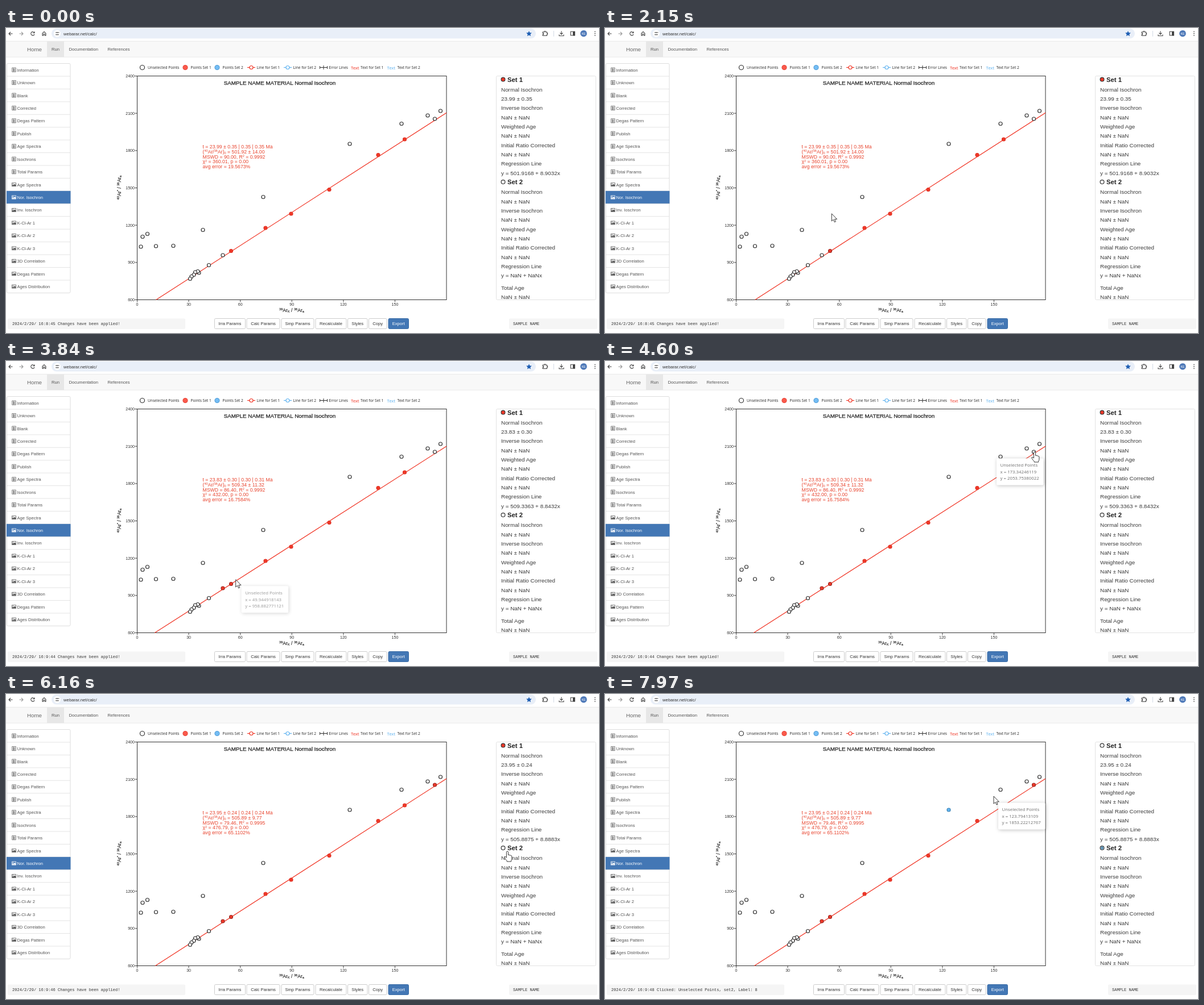
An HTML page for the animation above (8 s loop, 1042 by 537 pixels).

```html
<!DOCTYPE html>
<html lang="en">
<head>
<meta charset="utf-8">
<title>Normal Isochron</title>
<style>
html, body { margin: 0; width: 100%; height: 100%; overflow: hidden; background: #fff; }
svg { display: block; width: 1042px; height: 537px; font-family: "Liberation Sans", Arial, sans-serif; }
.ui { font-size: 7.65px; fill: #555; }
.noto { font-family: "Noto Sans", "Open Sans", sans-serif; }
.mono { font-family: "Liberation Mono", monospace; font-size: 7.03px; fill: #333; }
.axis { font-size: 7.1px; fill: #333; }
.panel { font-size: 9.88px; fill: #3a3a3a; }
.set { font-size: 11.3px; font-weight: bold; fill: #222; }
.fit { font-size: 8.7px; fill: #e8442e; }
.name { font-size: 8.7px; fill: #222; stroke: #222; stroke-width: .15px; }
.small { font-size: 5.6px; }
.mid { text-anchor: middle; }
.end { text-anchor: end; }
.icon { fill: none; stroke: #444; stroke-width: 1.1; }
</style>
</head>
<body>
<svg id="stage" viewBox="0 0 1042 537"></svg>
<script>
const LOOP = 8000;
const RED = '#f03828', BLUE = '#62b4f0', DARK = '#333', ACTIVE = '#4377b5';

// Pixel positions of the measured points
const open = [[237, 385], [240, 367.5], [248.5, 362.5], [263.5, 384], [294, 383.5], [346, 355.5],
  [452, 297.5], [356.5, 417.5], [339, 431], [337, 428.5], [332.5, 430], [330, 434.5], [326, 437.5],
  [323.5, 441.5], [695, 168.5], [741, 154], [763.5, 146]];
const chosen = [[456, 352], [501, 327], [568, 284.5], [654, 223.5], [700.5, 196]];
const clickable = [
  { x: 395.5, y: 392.5, at: 0, color: RED, rim: 1130 },
  { x: 381, y: 400, at: 3500, color: RED, rim: 3500 },
  { x: 753.5, y: 160, at: 5400, color: RED, rim: 5400 },
  { x: 604, y: 204, at: 7430, color: BLUE, rim: 9000 }
];

const fits = [
  { at: 0, t: '23.99', e: '0.35', more: '0.35 | 0.35', a: 501.9168, b: 8.9032, r: '501.92 ± 14.00',
    m: '90.00', r2: '0.9992', chi: '360.01', err: '19.5673' },
  { at: 3500, t: '23.83', e: '0.30', more: '0.30 | 0.31', a: 509.3363, b: 8.8432, r: '509.34 ± 11.32',
    m: '86.40', r2: '0.9992', chi: '432.00', err: '16.7584' },
  { at: 5400, t: '23.95', e: '0.24', more: '0.24 | 0.24', a: 505.8875, b: 8.8883, r: '505.89 ± 9.77',
    m: '79.46', r2: '0.9995', chi: '476.79', err: '65.1102' }
];

const done = 'Changes have been applied!';
const click = (set, label) => `Clicked: Unselected Points, set${set}, Label: ${label}`;
const logs = [
  { at: 0, text: '16:8:45 ' + done },
  { at: 3500, text: '16:9:44 ' + click(1, 5) },
  { at: 3740, text: '16:9:44 ' + done },
  { at: 5400, text: '16:9:46 ' + click(1, 9) },
  { at: 5630, text: '16:9:46 ' + done },
  { at: 7430, text: '16:9:48 ' + click(2, 8) }
];

const path = [[310, 955, 530], [1090, 427, 292], [1270, 419.5, 284], [1520, 420, 266], [1930, 405, 300],
  [2580, 380, 400], [3740, 380, 400], [4400, 755, 160], [5630, 755, 160], [6080, 881, 277],
  [6590, 881, 277], [6950, 603, 206.5], [7540, 603, 206.5], [7960, 683, 180]];
const hands = [[2540, 3800], [4360, 5680], [6060, 6630], [6930, 7580]];
const tips = [
  { from: 2560, to: 3980, max: 688, x: '49.944918143', y: '958.882771121' },
  { from: 4380, to: 5870, max: 688, x: '173.34246119', y: '2053.75380022' },
  { from: 6930, to: 8400, max: 691, x: '123.79413109', y: '1853.22212767' }
];

const text = (x, y, s, cls = 'ui', extra = '') => `<text x="${x}" y="${y}" class="${cls}" ${extra}>${s}</text>`;
const rect = (x, y, w, h, fill, stroke = 'none', r = 0) =>
  `<rect x="${x}" y="${y}" width="${w}" height="${h}" rx="${r}" fill="${fill}" stroke="${stroke}"/>`;
const circle = (x, y, r, fill, stroke = 'none', extra = '') =>
  `<circle cx="${x}" cy="${y}" r="${r}" fill="${fill}" stroke="${stroke}" stroke-width="1.2" ${extra}/>`;
const line = (d, color = DARK, w = 1) => `<path d="${d}" fill="none" stroke="${color}" stroke-width="${w}"/>`;
const icon = d => `<path class="icon" d="${d}"/>`;

// ^{..} raises and _{..} lowers the marked text
const rich = s => s.replace(/([\^_])\{(.*?)\}/g, (_, sign, body) => {
  const d = sign === '^' ? -2.6 : 1.4;
  return `<tspan class="small" dy="${d}">${body}</tspan><tspan dy="${-d}">&#8203;</tspan>`;
});

const px = x => 230.5 + x * 3.02;
const py = y => 478.5 - (y - 600) * 394 / 1800;

function browser() {
  return rect(0, 0, 1042, 23, '#fff') + rect(80, 1, 851, 17.5, '#e9eff8', 'none', 8.7) +
    icon('M11.5 10H5M8 7L5 10L8 13') +
    `<g opacity=".55">${icon('M23.5 10H30M27 7L30 10L27 13')}</g>` +
    icon('M49.6 8A3.2 3.2 0 1 0 50 11M50 6.2V8.7H47.4') +
    icon('M64 9.4L67 6.5L70 9.4V13.3H68.2V10.8H65.8V13.3H64Z') +
    circle(90, 9.8, 6, '#fff') + icon('M87 8H89M91 8H93.5M87 11.7H89M91 11.7H93') +
    circle(90, 8, .9, '#444') + circle(90, 11.7, .9, '#444') +
    text(101, 12.6, 'webarar.net/calc/', '', 'font-size="7.75" fill="#333"') +
    '<path d="M919 5.2l1.4 3 3.4.4-2.5 2.3.7 3.3-3-1.7-3 1.7.7-3.3-2.5-2.3 3.4-.4z" fill="#1f5fb4"/>' +
    icon('M943.2 7H946V5.8H948V7H950.5V9H951.6V11H950.5V13.5H943.2V11.4H944.6V9.2H943.2Z') +
    line('M962.5 5V15', '#d4dbe6') +
    icon('M976 5.5V11M973.5 8.7L976 11.2L978.5 8.7M972 11.5V13.7H980V11.5') +
    icon('M992.3 6.3H999.5V13H992.3Z') + rect(996, 6, 4, 7.4, '#444') +
    circle(1015, 9.7, 5.8, '#4e79b8') + text(1015, 11.6, 'KE', 'mid', 'font-size="5.2" fill="#fff"') +
    [6.3, 9.7, 13.1].map(y => circle(1035, y, .85, '#444')).join('');
}

function nav() {
  return rect(0, 23, 1042, 28, '#f8f8f8') + line('M0 23.3H1042M0 51.2H1042', '#e5e5e5', .8) +
    rect(72, 23.5, 30, 27.5, '#e7e7e7') + text(37, 40.8, 'Home', '', 'font-size="9.75" fill="#666"') +
    text(80, 40, 'Run') + text(110.5, 40, 'Documentation') + text(178.5, 40, 'References');
}

function sidebar() {
  const names = ['Information', 'Unknown', 'Blank', 'Corrected', 'Degas Pattern', 'Publish', 'Age Spectra',
    'Isochrons', 'Total Params', 'Age Spectra', 'Nor. Isochron', 'Inv. Ioschron', 'K-Cl-Ar 1', 'K-Cl-Ar 2',
    'K-Cl-Ar 3', '3D Correlation', 'Degas Pattern', 'Ages Distribution'];
  const step = 22.44;
  let out = rect(1.5, 62.5, 111.5, step * 18, '#fff', '#ddd', 2);
  names.forEach((name, i) => {
    const top = 62.5 + i * step, y = top + step / 2, on = i === 10;
    const ink = on ? '#fff' : '#555';
    if (i) out += line(`M1.5 ${top}H113`, '#ddd', .8);
    if (on) out += rect(1, top, 112.5, step, ACTIVE);
    out += i < 9
      ? line(`M10.7 ${y - 3.7}H17.3V${y + 3.5}H10.7ZM12 ${y - 1.5}H16.2M12 ${y + .2}H16.2M12 ${y + 1.9}H16.2M13.2 ${y - 3}V${y + 3}`, ink, .75)
      : line(`M10.4 ${y - 3}H17.6V${y + 3}H10.4Z`, ink, .8) + circle(12.4, y - 1.2, .8, ink) +
        `<path d="M11 ${y + 2.4}V${y + 1}L12.5 ${y}L13.3 ${y + .8}L15.3 ${y - 1.3}L17 ${y + .6}V${y + 2.4}Z" fill="${ink}"/>`;
    out += text(19.5, y + 2.9, name, 'ui', on ? 'style="fill:#fff"' : '');
  });
  return out;
}

function legend() {
  const labels = [[249, 'Unselected Points'], [324.5, 'Points Set 1'], [380.5, 'Points Set 2'],
    [440.5, 'Line for Set 1'], [504.5, 'Line for Set 2'], [567.5, 'Error Lines'],
    [623, 'Text for Set 1'], [687.5, 'Text for Set 2']];
  const big = (x, color) => text(x, 72.6, 'Text', 'noto', `font-size="7.6" fill="${color}"`);
  return circle(239.5, 69.5, 4, '#fff', DARK) + circle(315, 69.5, 4, '#fa5a4c', '#e8463a') +
    circle(371, 69.5, 4, '#74bdf4', '#559fd8') +
    line('M424 69.5H438', RED, 1.2) + circle(431, 69.5, 3, '#fff', RED) +
    line('M488 69.5H502', BLUE, 1.2) + circle(495, 69.5, 3, '#fff', BLUE) +
    line('M551.5 69.5H564.5M551.5 67V72M564.5 67V72M558 66V73') + big(606, RED) + big(669.5, BLUE) +
    labels.map(([x, s]) => text(x, 72, s, 'noto', 'font-size="6.6" fill="#333"')).join('');
}

function chart() {
  let out = rect(230.5, 84.5, 543.5, 394, '#fff', DARK);
  for (let v = 0; v <= 150; v += 30)
    out += line(`M${px(v)} 478.5v4`, DARK, .9) + text(px(v), 489.2, v, 'axis mid');
  for (let v = 600; v <= 2400; v += 300)
    out += line(`M230.5 ${py(v)}h-4`, DARK, .9) + text(226, py(v) + 2.6, v, 'axis end');
  out += text(481, 100.3, 'SAMPLE NAME MATERIAL Normal Isochron', 'mid',
    'font-size="9.84" fill="#222" stroke="#222" stroke-width=".25"');
  out += text(502, 499.7, rich('^{39}Ar_{K} / ^{36}Ar_{a}'), 'name mid');
  out += text(0, 0, rich('^{40}Ar^{*} / ^{36}Ar_{a}'), 'name mid', 'transform="translate(202 281) rotate(-90)"');
  out += '<path id="reg" fill="none" stroke="#f03020" stroke-width="1.2"/>';
  out += chosen.map(([x, y]) => circle(x, y, 3, RED, '#e03426')).join('');
  out += open.map(([x, y]) => circle(x, y, 3, '#fff', DARK)).join('');
  out += clickable.map((p, i) => circle(p.x, p.y, 3, '#fff', DARK, `id="pt${i}"`)).join('');
  for (let i = 0; i < 5; i++) out += text(345.5, 212 + i * 8.75, '', 'fit', `id="fit${i}"`);
  return out;
}

function panel() {
  const rows = ['Normal Isochron', 'Inverse Isochron', 'Weighted Age', 'Initial Ratio Corrected', 'Regression Line'];
  let out = rect(861.5, 84.5, 175, 394, '#fff', '#e2e2e2', 2);
  [[1, 91, 111.7], [2, 271.5, 292.4]].forEach(([n, y, top]) => {
    out += circle(873.5, y - .4, 3.4, '#fff', DARK, `id="radio${n}"`) + circle(873.5, y - .4, 1.5, 'none', 'none', `id="dot${n}"`);
    out += text(881, y + 3.8, 'Set ' + n, 'set');
    rows.forEach((row, i) => {
      const value = i === 4 ? 'y = NaN + NaNx' : 'NaN ± NaN';
      out += text(870, top + i * 32.64, row, 'panel') +
        text(870, top + 16.32 + i * 32.64, value, 'panel', `id="val${n}${i}"`);
    });
  });
  return out + text(870, 460.5, 'Total Age', 'panel') + text(870, 476.5, 'NaN ± NaN', 'panel');
}

function footer() {
  const buttons = [[366.5, 54, 'Irra Params'], [423, 58, 'Calc Params'], [484, 57, 'Smp Params'],
    [544, 54, 'Recalculate'], [600.5, 34.5, 'Styles'], [637.5, 31.5, 'Copy'], [672, 35.5, 'Export']];
  return rect(3, 511.5, 312, 18.5, '#f5f5f5', 'none', 2) + rect(884, 511.5, 155, 18.5, '#f5f5f5', 'none', 2) +
    text(11, 523, '', 'mono', 'id="log"') + text(891, 523, 'SAMPLE NAME', 'mono') +
    buttons.map(([x, w, s]) => {
      const on = s === 'Export';
      return rect(x, 511.5, w, 18, on ? ACTIVE : '#fff', on ? '#3a6ca6' : '#ccc', 2) +
        text(x + w / 2, 523.2, s, 'ui mid', `style="fill:${on ? '#fff' : '#333'}"`);
    }).join('');
}

const overlay = `
  <g id="tip">
    <rect width="82.5" height="47" rx="2" fill="#fff" style="filter:drop-shadow(1px 1px 3px rgba(0,0,0,.25))"/>
    ${[0, 1, 2].map(i => text(6.5, 14.6 + i * 11.6, '', 'noto', `id="tip${i}" font-size="7.8" fill="#777"`)).join('')}
  </g>
  <g id="cursor" fill="#fff" stroke="#222" stroke-width=".9" stroke-linejoin="round">
    <path id="arrow" d="M0 0V13.2L3 10.5L5 15L7 14.1L5.2 9.8H9.4Z"/>
    <path id="hand" d="M-1.6 1.5a1.6 1.6 0 0 1 3.2 0V6.5q1.4-.8 2.4.4q1.4-.5 2.2.6q1.7-.2 1.7 1.8V13q0 2-1.2 3.3V18H-.8V16.8Q-3 14.5-5 11.2q-.7-1.6.8-1.9q1.2 0 2.6 1.8Z"/>
  </g>`;

document.getElementById('stage').innerHTML =
  browser() + nav() + sidebar() + legend() + chart() + panel() + footer() + overlay;

const $ = id => document.getElementById(id);
const latest = (list, t) => list.filter(s => s.at <= t).pop();
const within = (t, a, b) => t >= a && t < b;
const show = (id, on) => $(id).setAttribute('visibility', on ? 'visible' : 'hidden');
const put = (id, s) => { $(id).textContent = s; };

function cursorAt(t) {
  const i = path.findIndex(k => k[0] > t);
  if (i < 0) return path[path.length - 1].slice(1);
  if (i === 0) return path[0].slice(1);
  const [t0, x0, y0] = path[i - 1], [t1, x1, y1] = path[i];
  const u = (t - t0) / (t1 - t0), e = u * u * (3 - 2 * u);
  return [x0 + (x1 - x0) * e, y0 + (y1 - y0) * e];
}

let shown = null;
function drawFit(f) {
  if (f === shown) return;
  shown = f;
  const x0 = (600 - f.a) / f.b;
  $('reg').setAttribute('d', `M${px(x0)} 478.5L${px(180)} ${py(f.a + 180 * f.b)}`);
  [`t = ${f.t} ± ${f.e} | ${f.more} Ma`, `(^{40}Ar/^{36}Ar)_{0} = ${f.r}`, `MSWD = ${f.m}, R^{2} = ${f.r2}`,
    `χ^{2} = ${f.chi}, p = 0.00`, `avg error = ${f.err}%`].forEach((s, i) => { $('fit' + i).innerHTML = rich(s); });
  put('val10', `${f.t} ± ${f.e}`);
  put('val14', `y = ${f.a} + ${f.b}x`);
}

function draw(t) {
  drawFit(latest(fits, t));
  put('log', '2024/2/29/ ' + latest(logs, t).text);

  clickable.forEach((p, i) => {
    const on = t >= p.at;
    $('pt' + i).setAttribute('fill', on ? p.color : '#fff');
    $('pt' + i).setAttribute('stroke', !on ? DARK : p.color === BLUE ? '#3f86b8' : t >= p.rim ? '#9c2c26' : '#e03426');
  });

  const second = t >= 6270;
  $('radio1').setAttribute('fill', second ? '#fff' : RED);
  $('radio2').setAttribute('fill', second ? '#8fc4e6' : '#fff');
  $('dot2').setAttribute('fill', second ? '#3c6a8a' : 'none');

  const [x, y] = cursorAt(t), hand = hands.some(([a, b]) => within(t, a, b));
  $('cursor').setAttribute('transform', `translate(${x} ${y})`);
  show('arrow', t >= 310 && !hand);
  show('hand', hand);

  const tip = tips.find(s => within(t, s.from, s.to));
  show('tip', tip);
  if (tip) {
    $('tip').setAttribute('transform', `translate(${Math.min(x + 10, tip.max)} ${y + 11.5})`);
    $('tip').setAttribute('opacity', Math.min(1, (t - tip.from) / 200, (tip.to - t) / 200));
    ['Unselected Points', 'x = ' + tip.x, 'y = ' + tip.y].forEach((s, i) => put('tip' + i, s));
  }
}

const start = performance.now();
function tick() {
  draw((performance.now() - start) % LOOP);
  requestAnimationFrame(tick);
}
tick();
</script>
</body>
</html>
```
